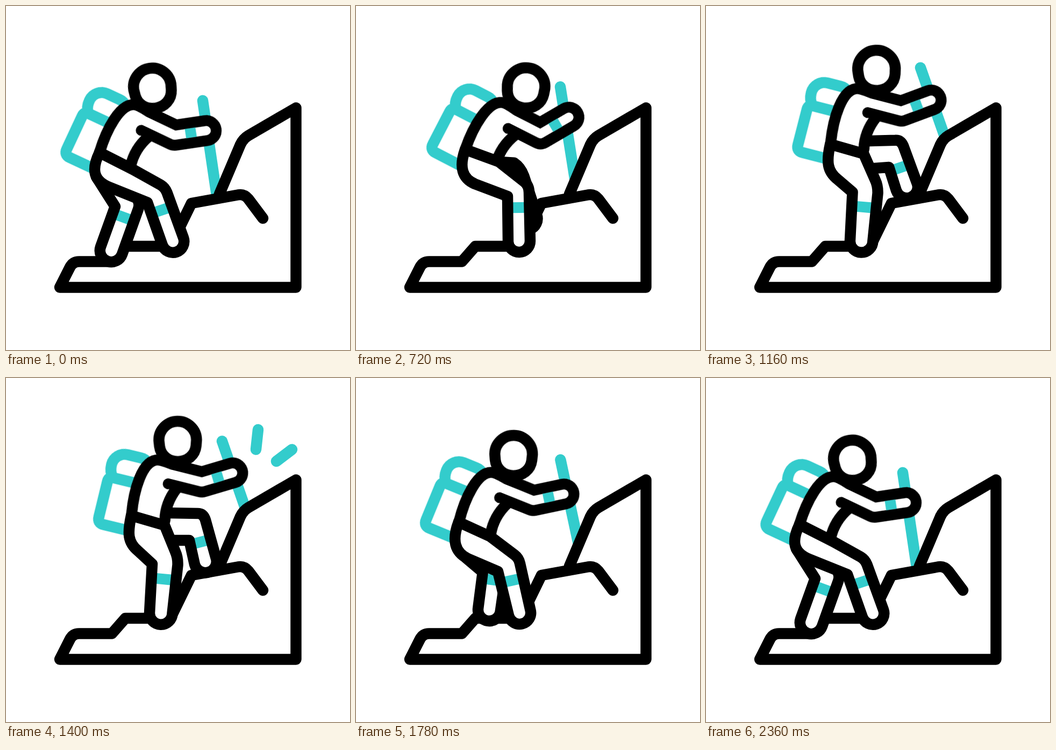
An HTML page without scripts that plays this animation: 640 by 640 pixels, repeating every 2.76 s.

```html
<!DOCTYPE html>
<html lang="en">
<head>
<meta charset="utf-8">
<title>Hiker</title>
<style>
html, body { margin: 0; width: 100%; height: 100%; overflow: hidden; background: #fff; }
svg { display: block; width: 100%; height: 100%; }
path { fill: none; stroke: #000; stroke-width: 20.5; stroke-linecap: round; stroke-linejoin: round; }
.teal { stroke: #3cc; }
.fill { fill: #fff; stroke: none; }
.solid { fill: #fff; }
.band { stroke: #3cc; stroke-width: 30; stroke-linecap: butt; }

.torso, .head, .arm, .leg, .shin, .back-leg, .back-shin, .stick, .burst { animation: 2760ms linear infinite; }
.torso { animation-name: torso; }
.head { animation-name: head; }
.arm { animation-name: arm; }
.leg { animation-name: leg; }
.shin { animation-name: shin; stroke-dasharray: 0 52 20 999; }
.back-leg { animation-name: back-leg; }
.back-shin { animation-name: back-shin; stroke-dasharray: 20 999; }
.stick { animation-name: stick; }
.burst { animation-name: burst; stroke-dasharray: 40 90; }

.arm.outer { stroke-width: 57.5; }
.arm.inner { stroke: #fff; stroke-width: 17; }
.arm.band { stroke-width: 17.5; stroke-dasharray: 0 19 20 999; }

/* Poses: rest, lean, pass, lift, summit (held), return, rest */
@keyframes torso {
  0%, 7.25%, 85.51%, 100% { transform: translate(108px, 277px) rotate(25deg); animation-timing-function: cubic-bezier(.4,0,.7,.8); }
  13.77% { transform: translate(118px, 268.5px) rotate(31.3deg); animation-timing-function: cubic-bezier(.4,.2,.7,.7); }
  26.09% { transform: translate(137.5px, 267.5px) rotate(27.4deg); }
  34.78% { transform: translate(160px, 268.5px) rotate(17.6deg); animation-timing-function: ease-out; }
  46.38%, 50.72% { transform: translate(170px, 270px) rotate(13.6deg); animation-timing-function: cubic-bezier(.4,0,.75,.75); }
  64.49% { transform: translate(126px, 275px) rotate(22.3deg); animation-timing-function: cubic-bezier(.2,.6,.4,1); }
}
@keyframes head {
  0%, 7.25%, 85.51%, 100% { transform: translate(272.7px, 153.5px) rotate(-9deg); animation-timing-function: cubic-bezier(.4,0,.7,.8); }
  13.77% { transform: translate(299.8px, 168px) rotate(4deg); animation-timing-function: cubic-bezier(.4,.2,.7,.7); }
  26.09% { transform: translate(316.2px, 153px) rotate(6deg); }
  34.78% { transform: translate(308.5px, 128px) rotate(-13deg); animation-timing-function: ease-out; }
  46.38%, 50.72% { transform: translate(319.5px, 118.5px) rotate(-1deg); animation-timing-function: cubic-bezier(.4,0,.75,.75); }
  64.49% { transform: translate(293.3px, 144.7px) rotate(1deg); animation-timing-function: cubic-bezier(.2,.6,.4,1); }
}
@keyframes arm {
  0%, 7.25%, 85.51%, 100% { d: path("M220.6 -152.7L171 -120L111 -120.5"); animation-timing-function: cubic-bezier(.4,0,.7,.8); }
  13.77% { d: path("M215.7 -155.2L171 -120L111 -120.5"); animation-timing-function: cubic-bezier(.4,.2,.7,.7); }
  26.09% { d: path("M201.7 -172.6L169 -121L111 -120.5"); }
  34.78% { d: path("M205.5 -170.5L170 -121L111 -120.5"); animation-timing-function: ease-out; }
  46.38%, 50.72% { d: path("M222.7 -150L171 -120L111 -120.5"); animation-timing-function: cubic-bezier(.4,0,.75,.75); }
  64.49% { d: path("M219 -153.8L171 -121L111 -120.5"); animation-timing-function: cubic-bezier(.2,.6,.4,1); }
}
@keyframes leg {
  0%, 7.25%, 85.51%, 100% { d: path("M174 272.5C158 305 163 325 192 337L263 365.5L291 445A20 20 0 0 0 330 431L299.5 347Q296 338 288 333L236 304Z"); animation-timing-function: cubic-bezier(.4,0,.7,.8); }
  13.77% { d: path("M183 273C168 303 175 329 203 339L281 364L291.5 440A20 20 0 0 0 332.5 433L319 346Q317 334 306 328.5L243 298Z"); animation-timing-function: cubic-bezier(.4,.2,.7,.7); }
  26.09% { d: path("M203 267C191 300 198 321 221 331L282 354L283 438A20 20 0 0 0 324 437L322 347Q322 334 313 327L266 290Z"); }
  34.78% { d: path("M223 262C215 295 221 313 243 328L275 348L272 437A20 20 0 0 0 314 437L320 348Q319 334 314 326L286 279Z"); animation-timing-function: ease-out; }
  46.38%, 50.72% { d: path("M233 256C226 288 226 306 246 322L272 346L267 437A20 20 0 0 0 309.5 438L319.5 348Q320 334 315 323L295 274Z"); animation-timing-function: cubic-bezier(.4,0,.75,.75); }
  64.49% { d: path("M191 268C178 302 184 324 208 336L264 360L284 442A20 20 0 0 0 324.5 432L305 345Q303 335 295 329L250 295Z"); animation-timing-function: cubic-bezier(.2,.6,.4,1); }
}
@keyframes shin {
  0%, 7.25%, 85.51%, 100% { d: path("M310.5 438L284 359"); animation-timing-function: cubic-bezier(.4,0,.7,.8); }
  13.77% { d: path("M312 436.5L300 359"); animation-timing-function: cubic-bezier(.4,.2,.7,.7); }
  26.09% { d: path("M303.5 437L302.5 352"); }
  34.78% { d: path("M293 436L299 347"); animation-timing-function: ease-out; }
  46.38%, 50.72% { d: path("M288.5 436L297 346"); animation-timing-function: cubic-bezier(.4,0,.75,.75); }
  64.49% { d: path("M304 437L286 354"); animation-timing-function: cubic-bezier(.2,.6,.4,1); }
}
@keyframes back-leg {
  0%, 7.25%, 85.51%, 100% { d: path("M168 318L203 373L176 448A20 20 0 0 0 216 462L246 378Q250 366 243 358L215 320"); animation-timing-function: cubic-bezier(.4,0,.7,.8); }
  13.77% { d: path("M183 325L208 374L177 446A20 20 0 0 0 215 464L253 381Q258 371 252 362L225 325"); animation-timing-function: cubic-bezier(.4,.2,.7,.7); }
  26.09% { d: path("M250 320L270 325L296 403A20 20 0 0 0 336 389L312 316Q306 300 294 292L262 290"); }
  34.78% { d: path("M300 304L337 291L368 330A20 20 0 0 0 400 304L352 248Q344 236 332 240L290 252"); animation-timing-function: ease-out; }
  46.38%, 50.72% { d: path("M308 302L341 302L351 347A20 20 0 0 0 391 336L371 264Q367 252 357 252L298 251"); animation-timing-function: cubic-bezier(.4,0,.75,.75); }
  64.49% { d: path("M205 335L236 361L227.5 428A20 20 0 0 0 269 434L277 378Q278 362 268 352L240 325"); animation-timing-function: cubic-bezier(.2,.6,.4,1); }
}
@keyframes back-shin {
  0%, 7.25%, 85.51%, 100% { d: path("M196 455L225 375"); stroke-dashoffset: -56px; animation-timing-function: cubic-bezier(.4,0,.7,.8); }
  13.77% { d: path("M196 455L231 375"); stroke-dashoffset: -54px; animation-timing-function: cubic-bezier(.4,.2,.7,.7); }
  26.09% { d: path("M316 396L291 320"); stroke-dashoffset: -45px; }
  34.78% { d: path("M384 317L344 268"); stroke-dashoffset: -31px; animation-timing-function: ease-out; }
  46.38%, 50.72% { d: path("M371 341L354 275"); stroke-dashoffset: -27px; animation-timing-function: cubic-bezier(.4,0,.75,.75); }
  64.49% { d: path("M248 431L257 355"); stroke-dashoffset: -46px; animation-timing-function: cubic-bezier(.2,.6,.4,1); }
}
@keyframes stick {
  0%, 7.25%, 85.51%, 100% { d: path("M366 176L392 352"); animation-timing-function: cubic-bezier(.4,0,.7,.8); }
  13.77% { d: path("M370 176L394 352"); animation-timing-function: cubic-bezier(.4,.2,.7,.7); }
  26.09% { d: path("M380 150.5L408 328"); }
  34.78% { d: path("M386 102.5L446 262"); animation-timing-function: ease-out; }
  46.38%, 50.72% { d: path("M402 117.5L452 262"); animation-timing-function: cubic-bezier(.4,0,.75,.75); }
  64.49% { d: path("M380.5 152L416 318"); animation-timing-function: cubic-bezier(.2,.6,.4,1); }
}
@keyframes burst {
  0%, 43.48% { stroke-dashoffset: 41px; }
  49.28%, 51.45% { stroke-dashoffset: 0px; }
  57.97%, 100% { stroke-dashoffset: -41px; }
}
</style>
</head>
<body>
<svg viewBox="0 0 640 640">
  <path class="teal stick"/>
  <path class="solid" d="M397 350L436 258Q441 247 451 241L539.5 189.5V523.5H100L119 486Q124.5 475.5 136 475.5H197L222 447H306L345 367L431 351.5Q443 349 451 359L478 395"/>
  <path class="teal burst" pathLength="40" d="M465 133L469 96"/>
  <path class="teal burst" pathLength="40" d="M503 155L532 133"/>

  <path class="back-leg fill"/>
  <path class="back-shin band"/>
  <path class="back-leg"/>

  <g class="torso">
    <path class="teal" d="M63 -89H9Q0 -89 0 -80V-12Q0 0 12 0H63M8 -89Q0 -98 0 -112A25 25 0 0 1 25 -137H50A22 22 0 0 1 72 -115"/>
    <path class="arm outer"/>
    <path class="fill" d="M58 -31C52 -72 52 -135 83 -141Q92 -142 111 -139V-102L128 -97Q114 -66 121 -34Z"/>
    <path d="M58 -31C52 -72 52 -135 83 -141Q92 -142 111 -139M128 -97Q114 -66 121 -34"/>
    <circle cx="111" cy="-102" r="10.2"/>
    <path class="arm inner"/>
    <path class="arm band"/>
  </g>

  <path class="head solid" d="M-35 -3A35 35 0 0 1 35 -3L34 8C32 26 17 37 0 37S-32 26 -34 8Z"/>

  <path class="leg fill"/>
  <path class="shin band"/>
  <path class="leg"/>
</svg>
</body>
</html>
```
